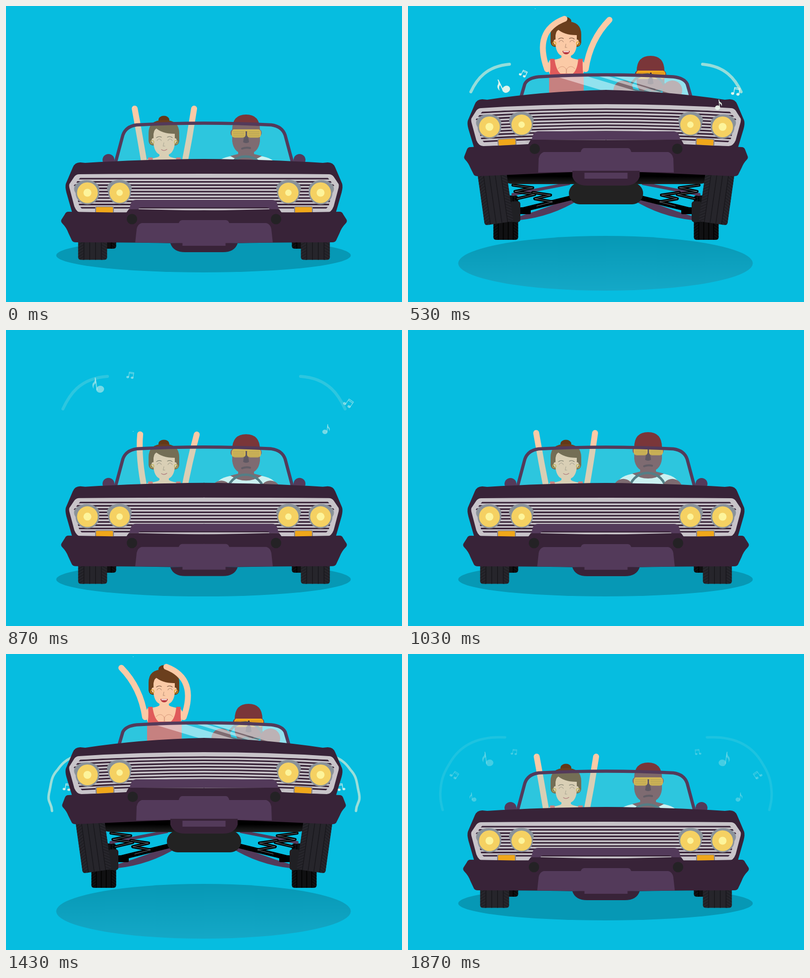
Recreate the animation shown at these times as an HTML page with a canvas. Size 800 px wide and 600 px high, loop 1.91 s.

```html
<!DOCTYPE html>
<html lang="en">
<head>
<meta charset="utf-8">
<title>Bouncing lowrider</title>
<style>
html, body { margin: 0; height: 100%; overflow: hidden; background: #06bde0; }
canvas { display: block; }
</style>
</head>
<body>
<canvas id="stage" width="800" height="600"></canvas>
<script>
const c = document.getElementById('stage').getContext('2d');
const LOOP = 1910, HOP = LOOP / 2;
const PLUM = '#382338', PURPLE = '#533a5a', SILVER = '#c8c4c9', SKIN = '#fbcaa6', BROWN = '#793a44', HAIR = '#6b3f1d';

const clamp = v => Math.max(0, Math.min(1, v));
const mix = (a, b, u) => a + (b - a) * u;
const ease = v => { const u = clamp(v); return u < .5 ? 2 * u * u : 1 - 2 * (1 - u) ** 2; };

// Linear interpolation through [x, value] pairs
function key(x, pairs) {
  for (let i = 1; i < pairs.length; i++) {
    const [x0, a] = pairs[i - 1], [x1, b] = pairs[i];
    if (x <= x1) return mix(a, b, clamp((x - x0) / (x1 - x0)));
  }
  return pairs[pairs.length - 1][1];
}

const fill = (color, d) => { c.fillStyle = color; c.fill(new Path2D(d)); };
function stroke(color, width, d) {
  c.strokeStyle = color;
  c.lineWidth = width;
  c.lineCap = c.lineJoin = 'round';
  c.stroke(new Path2D(d));
}
function oval(color, x, y, rx, ry = rx) {
  c.fillStyle = color;
  c.beginPath();
  c.ellipse(x, y, rx, ry, 0, 0, 7);
  c.fill();
}
function box(color, x, y, w, h, r = 0) {
  c.fillStyle = color;
  c.beginPath();
  c.roundRect(x, y, w, h, r);
  c.fill();
}
function place(x, y, draw, rot = 0, sx = 1, sy = sx) {
  c.save();
  c.translate(x, y);
  c.rotate(rot);
  c.scale(sx, sy);
  draw();
  c.restore();
}
const both = draw => { draw(); place(800, 0, draw, 0, -1, 1); };

let p;                                   // lift of the car, 0 to 1
const y = (rest, rise) => rest - rise * p;

function shadow() {
  const cy = 505.5 + 16 * p, ry = 34.5 + 21 * p, g = c.createLinearGradient(0, cy - ry, 0, cy + ry);
  g.addColorStop(0, '#0698b5');
  g.addColorStop(1, `rgb(${mix(6, 20, p)},${mix(152, 168, p)},${mix(181, 199, p)})`);
  oval(g, 399, cy, 297.5, ry);
}

function tyre(x, bottom, w, h, rot, color, groove) {
  place(x, bottom, () => {
    box(color, -w / 2, -h, w, h, 5);
    c.save();
    c.clip();
    for (let i = 1; i < 5; i++) stroke(groove, 1.6, `M${w * (i / 5 - .5)},${-h}V0`);
    for (let v = -h; v < 8; v += 6)
      stroke(groove, 1, `M${-w / 2},${v}l${w * .2},-7M${w / 2},${v}l${-w * .2},-7`);
    c.restore();
  }, rot);
}

function chassis() {
  const lift = clamp((p - .65) / .35) * 18;
  const hub = 442 - lift - 10 * p, inner = y(451, 66), tray = y(473, 112);
  both(() => {
    tyre(197.5, 492 - lift, 50, 90, 0, '#101012', '#000');
    stroke(PURPLE, 6, `M212,${y(430, 48)}L325,${y(432, 72)}`);
    fill(PURPLE, `M226,${hub + 12}Q290,${inner + 22} 345,${inner - 4}L345,${inner + 8}Q290,${inner + 42} 226,${hub + 20}Z`);
    stroke('#000', 10, `M228,${hub}L345,${inner}`);
    box('#000', 226, hub - 6, 22, 14, 2);
    const s = (hub - tray) / 50, zig = [[212, 2, 40], [252, 16, 36]];
    for (const [x, dy, w] of zig) {
      const d = `M${x},${tray + dy * s}l${w},${5 * s}l${-w + 4},${7 * s}l${w},${6 * s}l${-w + 4},${8 * s}`;
      stroke('#000', 6, d);
      stroke('#8d99a0', .8, d);
    }
    box('#202024', 207, hub - 18, 20, 42, 5);
  });
  const g = c.createLinearGradient(0, tray - 26, 0, tray);
  g.addColorStop(.4, '#000');
  g.addColorStop(1, '#222');
  fill(g, `M196,${tray - 30}H604V${tray - 8}Q604,${tray} 580,${tray}H220Q196,${tray} 196,${tray - 8}Z`);
  const base = y(468, 66);
  box('#222', 325, base - 44, 150, 44, 22);
  both(() => tyre(175 + 9 * p, y(514.5, 74), 58.5, 108, -.14 * p, '#26252b', '#19181d'));
}

function woman(t) {
  const w = p ** 1.15;
  const sway = key(t, [[0, 0], [80, 0], [270, .6], [400, 1], [560, 1], [870, .2], [955, 0],
    [1035, -.04], [1170, -.35], [1350, -1], [1515, -1], [1840, 0]]);
  const s = Math.abs(sway);
  place(0, 200 * (1 - w), () => {
    // bun and hair
    oval('#633817', 319, 31, 11, 8.5);
    fill(HAIR, 'M288,58Q288,31 319,31Q350,31 350,58V74Q349,83 338,83H300Q289,83 288,74Z');
    // torso and dress
    fill(SKIN, 'M310,94H329V104Q334,108 352,110L361,124L352,140H287L280,122L286,110Q306,108 310,104Z');
    fill('#e05a5a', 'M287,107H296Q299,130 308,137H333Q342,130 344,107H353Q352,130 355,145V270H285V145Q289,130 287,107Z');
    stroke('#d99a7c', 1, 'M303,127Q312,118 319,127Q321,133 319,137M337,127Q329,118 321,127Q319,133 321,137');
    // face
    oval(SKIN, 297, 73, 3, 5);
    oval(SKIN, 342, 73, 3, 5);
    fill(SKIN, 'M298,60Q298,45 319,45Q341,45 341,60V78Q339,103 319.5,103Q300,103 298,78Z');
    fill(HAIR, 'M296,63Q299,57 301,46Q316,60 343,59V45Q330,34 305,36Q296,40 296,63Z');
    stroke('#b98f75', 1.1, 'M305,73Q309.5,66 314,73M327,73Q331.5,66 336,73M319,77L317.5,84H321');
    stroke('#6b4a35', 1.1, 'M304,67Q309,63 314,66M326,66Q331,63 336,67');
    for (const x of [295.5, 343.5]) {
      c.strokeStyle = '#d9a520';
      c.lineWidth = 1.3;
      c.beginPath();
      c.arc(x, 76, 3.3, 0, 7);
      c.stroke();
    }
    const open = clamp((p - .15) * 2);
    if (open > 0) {
      fill('#b5343c', `M312,91H327Q326,${91 + 7 * open} 319.5,${91 + 7 * open}Q313,${91 + 7 * open} 312,91Z`);
      if (open > .7) box('#fff', 314, 91.5, 11, 2);
    } else stroke('#c0565a', 1.3, 'M314,91Q319,95 325,90.5');
    // arms, mirrored for the second hop
    const arms = () => {
      stroke(SKIN, 12, `M281,128Q${270 - 17 * s},${62 - 12 * s} ${260 + 56 * s},${8 + 18 * s}`);
      stroke(SKIN, 12, `M359,128Q${371 - 3 * s},68 ${380 + 27 * s},${8 + 20 * s}`);
    };
    sway < 0 ? place(640, 0, arms, 0, -1, 1) : arms();
    box('rgba(255,255,255,.4)', 256, 5, 2, 1);
  });
}

function driver(t) {
  const head = key(t, [[0, 220], [80, 220], [270, 148], [405, 101], [560, 101], [870, 211], [940, 220],
    [1010, 216], [1170, 148], [1330, 101], [1515, 101], [1680, 160], [1840, 220]]);
  const wheel = key(t, [[0, 303], [80, 303], [270, 211], [405, 137], [560, 137], [870, 291], [940, 303],
    [1010, 298], [1170, 220], [1350, 137], [1515, 137], [1680, 222], [1840, 303]]);
  place(485 + 5 * p, head, () => {
    fill('#e8fafb', 'M-64,104Q-54,87 -28,84H28Q54,87 64,104V150H-64Z');
    fill(BROWN, 'M-16,66H16V80L32,84Q0,104 -32,84L-16,80Z');
    oval(BROWN, -28, 37, 3.5, 6);
    oval(BROWN, 28, 37, 3.5, 6);
    fill(BROWN, 'M-28,28H28V54Q25,80 0,80Q-25,80 -28,54Z');
    fill('#7a3639', 'M-28,31Q-28,0 0,0Q28,0 28,31Q0,26 -28,31Z');
    fill('#4d2030', 'M-2,32H2L6,56Q0,60 -6,56Z');
    stroke('#522735', 4, 'M-8,69Q0,66 8,68');
    box('#f0a61c', -29, 30, 28, 17, 6);
    box('#f0a61c', 2, 30, 28, 17, 6);
    stroke('#f0a61c', 4, 'M-25,32H25');
    for (let v = 35; v < 46; v += 3.5) stroke('#b87b22', .9, `M-26,${v}H-4M5,${v}H27`);
  });
  stroke('#3d5662', 5, `M447,${wheel + 38}a37,36 0 0 1 74,0a37,36 0 0 1 -74,0M450,${wheel + 32}L484,${wheel + 41}L518,${wheel + 32}`);
  oval('#3d5662', 484, wheel + 40, 9);
  oval(BROWN, 435, wheel + 34, 20);
  oval(BROWN, 534, wheel + 34, 20);
}

function windshield() {
  const top = y(237.5, 98), base = y(322, 140), knee = y(262, 104);
  const left = 220 + 9 * p;
  const d = `M${left},${base}L236,${knee}Q242,${y(244, 98)} 264,${y(241, 97.5)}Q330,${top} 400,${top}` +
    `Q470,${top} 536,${y(241, 97.5)}Q558,${y(244, 98)} 564,${knee}L${800 - left},${base}`;
  c.save();
  c.clip(new Path2D(d + 'Z'));
  c.fillStyle = 'rgba(135,217,216,.3)';
  c.fillRect(200, 100, 400, 250);
  // diagonal reflections sweeping to the right
  const lead = key(p, [[0, -45], [.34, 208], [.65, 290], [1, 545]]);
  for (const [a, b] of [[-140, 0], [-170, -150], [-257, -193]])
    fill('rgba(255,255,255,.48)', `M${lead + a},${top}H${lead + b}l330,100H${lead + a + 330}Z`);
  c.restore();
  stroke(PURPLE, 6.5, d);
}

function body() {
  both(() => fill(PLUM, `M401,${y(310, 140)}Q270,${y(311, 138)} 160,${y(318, 128)}L150,${y(317, 128)}` +
    `Q139,${y(317, 128)} 135,${y(327, 128)}L121,${y(360, 128)}Q119,${y(366, 128)} 122,${y(378, 129)}` +
    `L134,${y(420, 131)}L150,${y(440, 132)}H401Z`));
  both(() => fill(SILVER, `M401,${y(340, 141)}Q270,${y(340, 141)} 148,${y(341, 134)}Q142,${y(341, 134)} 138,${y(346, 134)}` +
    `L128,${y(361, 133)}Q127,${y(364, 133)} 128,${y(368, 133)}L138,${y(406, 134)}Q143,${y(419, 135)} 152,${y(419, 135)}` +
    `L401,${y(417, 141)}Z`));
  // grille
  const hole = `M150,${y(348, 134)}Q280,${y(348, 141)} 400,${y(348, 141)}T650,${y(348, 134)}L663,${y(364, 134)}` +
    `L652,${y(405, 135)}L646,${y(412, 135)}L400,${y(415, 141)}L154,${y(412, 135)}L148,${y(405, 135)}L137,${y(364, 134)}Z`;
  c.save();
  c.clip(new Path2D(hole));
  for (let v = 350; v < 416; v += 6.55)
    stroke(PLUM, 3.1, `M130,${y(v, 133)}Q400,${y(v, 149)} 670,${y(v, 133)}`);
  c.restore();
  // lamps
  both(() => {
    const outer = y(378.5, 133.5), near = y(378.5, 138);
    oval('#8a9299', 163, outer - 8, 25.5, 17.5);
    oval('#8a9299', 164.5, outer, 24);
    oval('#f5d162', 164.5, outer, 21);
    oval('#fdf49b', 164.5, outer, 8);
    oval('#8a9299', 229, near - 9, 25, 17);
    oval('#8a9299', 229.5, near, 23);
    oval('#f5d162', 229.5, near, 20.5);
    oval('#fdf49b', 229.5, near, 6.5);
    place(199 + p, y(413.5, 137.5), () => {
      box('#85838a', -19, -7.5, 38, 15, 3);
      box('#f0a71a', -17, -6, 34, 12, 2);
    }, -.06 * p);
  });
}

function bumper() {
  both(() => fill(PURPLE, `M401,${y(393, 139)}H262Q254,${y(393, 138)} 252,${y(401, 138)}L249,${y(412, 138)}` +
    `H268Q268,${y(408, 137)} 275,${y(408, 137)}H401Z`));
  both(() => fill(PLUM, `M401,${y(415, 143.5)}L270,${y(412, 141)}H248L243,${y(419, 139)}L126,${y(417, 131)}` +
    `Q121,${y(417, 131)} 119,${y(422, 131)}L${112 + 2 * p},${y(433, 129)}Q${110 + 2 * p},${y(437, 129)} ${114 + 2 * p},${y(441, 129)}` +
    `Q122,${y(449, 131)} 126,${y(460, 132)}L133,${y(475, 133)}Q135,${y(479, 134)} 141,${y(479, 134)}` +
    `Q270,${y(479, 140)} 401,${y(482, 148)}Z`));
  both(() => {
    fill(PURPLE, `M401,${y(434, 146)}H356Q351,${y(434, 146)} 349,${y(440, 144)}H274Q266,${y(442, 143)} 264,${y(452, 143)}` +
      `L${261 + 2 * p},${y(479.5, 142)}Q330,${y(480, 144)} 401,${y(481, 146)}Z`);
    oval('#242225', 254.5 + 1.5 * p, y(432, 142.5), 10.5);
  });
  const top = y(481, 147), low = y(499, 135);
  fill(PLUM, `M332,${top}H468V${low - 18}Q462,${low} 438,${low}H362Q338,${low} 332,${low - 18}Z`);
  const plate = y(478, 140);
  box(PURPLE, 356.5, plate, 87, y(486, 136) - plate);
}

function note(pair, x, y0, size, rot, flip = 1) {
  place(x, y0, () => {
    const color = '#e9f6ec';
    if (pair) {
      oval(color, -6, 7, 3.6, 3);
      oval(color, 6, 7, 3.6, 3);
      stroke(color, 1.6, 'M-3.5,7V-7H8.5V7M-3.5,-4H8.5');
    } else {
      oval(color, 5, 9, 8, 7);
      stroke(color, 2, 'M-1.5,9V-15');
      fill(color, 'M-1,-16Q-3,-8 -8,-5Q-11,0 -8,6Q-8,-2 -1,-5Z');
    }
  }, rot, size * flip, size);
}

const between = (a, b, u) => a.map((v, i) => mix(v, b[i], u));
const curve = a => `M${a.slice(0, 2)}C${a.slice(2)}`;

function firstSound(t) {
  if (t < 150 || t > 955) return;
  const at = (a, b, d) => key(t, [[150, a - (b - a) * .3], [270, a], [530, b], [870, d], [950, d + (d - b) * .2]]);
  c.globalAlpha = key(t, [[150, 0], [270, .8], [530, .72], [620, .7], [870, .2], [950, 0]]);
  const x0 = at(142, 127, 115), y0 = at(194, 174, 160), y1 = at(147, 118, 94);
  both(() => stroke('#cdebd9', 6, `M${x0},${y0}C${x0 + 12},${y0 - 26} ${x0 + 32},${y1 + 4} 205,${y1}`));
  c.globalAlpha = key(t, [[170, 0], [270, .45], [530, .95], [640, .9], [870, .5], [950, .1]]);
  note(false, at(200, 190, 184), at(212, 163, 112), 1, at(-.8, -.45, -.15));
  note(true, at(214, 233, 251), at(188, 136, 91), .75, at(.5, .45, .15));
  note(false, at(606, 628, 648), at(203, 200, 201), .65, at(.25, -.1, .1), -1);
  note(true, at(627, 662, 692), at(201, 172, 147), .9, at(0, .15, .6));
  c.globalAlpha = 1;
}

function secondSound(t) {
  if (t < 1200) return;
  const u = key(t, [[1200, -.6], [1430, 0], [1870, 1], [1910, 1.05]]);
  const low = between([93, 318, 92, 300, 83, 302, 87, 282], [70, 316, 66, 300, 64, 288, 66, 272], u);
  const mid = between([92, 262, 90, 250, 104, 235], [68, 252, 74, 238, 84, 222], u);
  const end = between([113, 222, 120, 216, 132, 210], [104, 186, 140, 166, 196, 169], u);
  both(() => {
    c.globalAlpha = key(t, [[1200, 0], [1330, .7], [1430, .75], [1600, .65], [1870, .12], [1910, 0]]);
    stroke('#cdebd9', 5, `${curve(low)}C${mid}C${end}`);
    c.globalAlpha = key(t, [[1200, 0], [1430, .85], [1600, .8], [1870, .28], [1910, .05]]);
    note(false, mix(185, 159, u), mix(260, 213, u), .95, -.15);
    note(true, mix(215, 214, u), mix(255, 198, u), .65, .1);
    note(true, mix(123, 94, u), mix(269, 244, u), .8, mix(.15, .6, u));
    note(false, mix(165, 130, u), mix(300, 290, u), .6, -.1);
  });
  c.globalAlpha = 1;
}

function draw(t) {
  const h = t % HOP;
  p = ease((h - 80) / 325) * (1 - ease((h - 555) / 325));
  c.fillStyle = '#06bde0';
  c.fillRect(0, 0, 800, 600);
  shadow();
  secondSound(t);
  chassis();
  both(() => oval(PURPLE, 207, y(312, 98), 12));
  woman(t);
  driver(t);
  windshield();
  body();
  bumper();
  firstSound(t);
}

const start = performance.now();
function tick() {
  draw((performance.now() - start) % LOOP);
  requestAnimationFrame(tick);
}
tick();
</script>
</body>
</html>
```
